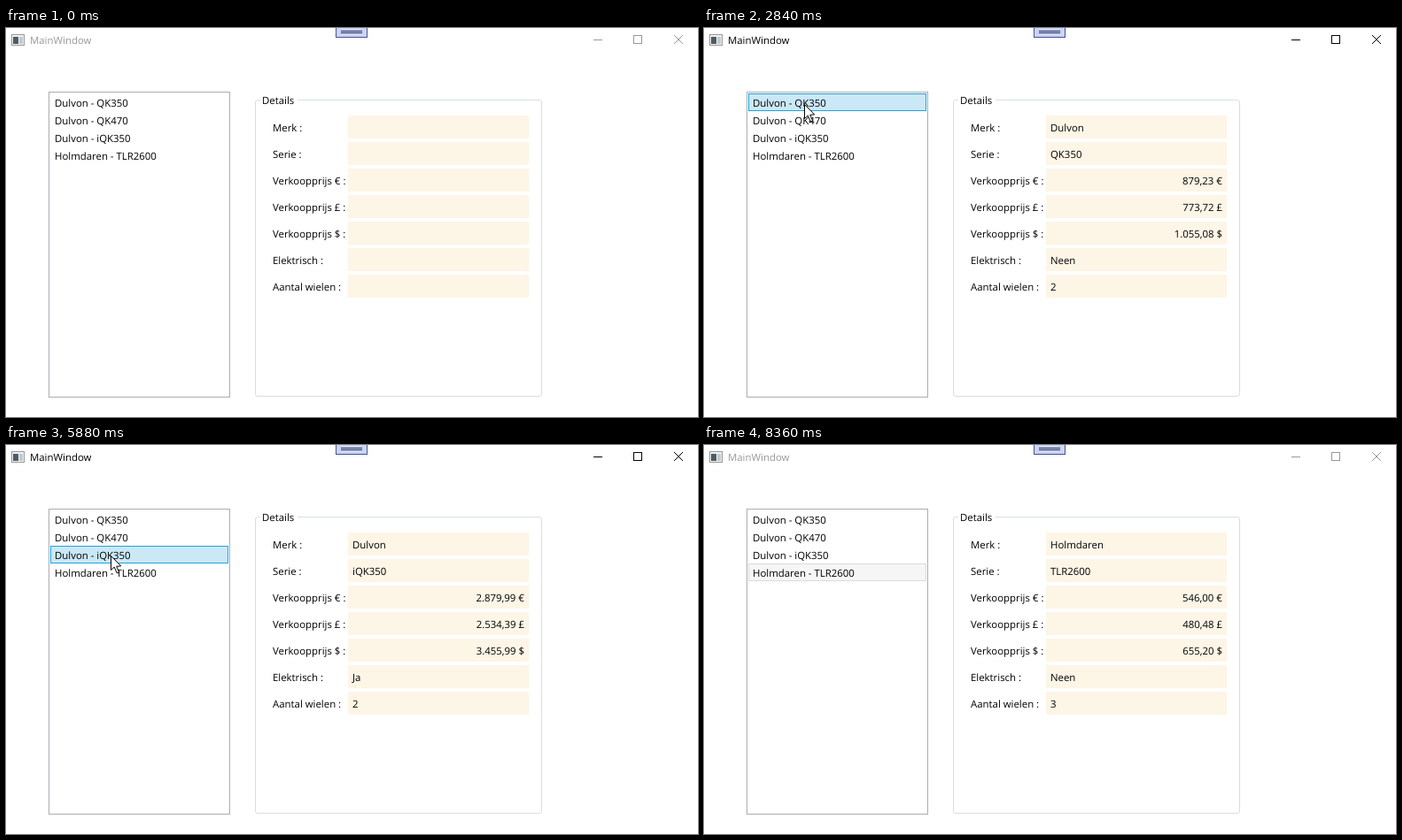
Recreate the animation shown at these times as an HTML page with a canvas. Size 781x440 px, loop 8.55 s.

```html
<!DOCTYPE html>
<html lang="nl">
<head>
<meta charset="utf-8">
<title>MainWindow</title>
<style>
  html, body { margin: 0; width: 100%; height: 100%; overflow: hidden; background: #fff; }
  canvas { display: block; }
</style>
</head>
<body>
<canvas id="stage" width="781" height="440"></canvas>
<script>
const ctx = document.getElementById('stage').getContext('2d');
const LOOP = 8550;
const STEP = 74;             // the screen refreshes in steps of this length
const FOCUS = 2690, BLUR = 8360;
const ENTER = 1190, LEAVE = 7510;
const ROW_TOP = 74, ROW_H = 20;

const labels = ['Merk :', 'Serie :', 'Verkoopprijs € :', 'Verkoopprijs £ :',
  'Verkoopprijs $ :', 'Elektrisch :', 'Aantal wielen :'];

const bikes = [
  { brand: 'Dulvon', series: 'QK350', euro: 879.23, electric: 'Neen', wheels: 2, click: FOCUS },
  { brand: 'Dulvon', series: 'QK470', euro: 1245.3, electric: 'Neen', wheels: 2, click: 4720 },
  { brand: 'Dulvon', series: 'iQK350', euro: 2879.99, electric: 'Ja', wheels: 2, click: 5570 },
  { brand: 'Holmdaren', series: 'TLR2600', euro: 546, electric: 'Neen', wheels: 3, click: 6740 }
];

const easeIn = u => u ** 2.4;
const easeOut = u => 1 - (1 - u) ** 2;
const easeBoth = u => u < .5 ? 2 * u * u : 1 - 2 * (1 - u) ** 2;

// Pointer glides, each from the last resting place
const entry = { x: 277, y: 349 };
const glides = [
  { at: ENTER, steps: 6, x: 127, y: 70, ease: easeOut },
  { at: 1640, steps: 4, x: 116, y: 87, ease: easeOut },
  { at: 2220, steps: 2, x: 113, y: 86, ease: easeOut },
  { at: 3320, steps: 1, x: 113, y: 81, ease: easeOut },
  { at: 3780, steps: 4, x: 117, y: 108, ease: easeBoth },
  { at: 4320, steps: 2, x: 117, y: 105, ease: easeOut },
  { at: 5040, steps: 6, x: 119, y: 129, ease: easeIn },
  { at: 5740, steps: 4, x: 118, y: 124, ease: easeOut },
  { at: 6200, steps: 6, x: 119, y: 152, ease: easeBoth },
  { at: 6740, steps: 5, x: 117, y: 142, ease: easeBoth },
  { at: 7220, steps: 4, x: 497, y: 322, ease: easeBoth }
];

const arrow = new Path2D('M0 0V16L3.7 12.6L6.8 19.5L9.2 18.5L6.2 11.8L11.2 11.4Z');

function pointerAt(t) {
  if (t < ENTER || t >= LEAVE) return null;
  const i = glides.filter(g => g.at <= t).length - 1;
  const from = glides[i - 1] || entry, to = glides[i];
  const done = Math.floor((t - to.at) / STEP) + 1;
  const p = to.ease(Math.min(done / to.steps, 1));
  const mix = (a, b) => Math.round(a + (b - a) * p);
  return { x: mix(from.x, to.x), y: mix(from.y, to.y) };
}

const selectedAt = t => bikes.filter(b => b.click <= t).length - 1;

function money(value, sign) {
  const [whole, cents] = value.toFixed(2).split('.');
  return whole.replace(/\B(?=(\d{3})+$)/g, '.') + ',' + cents + ' ' + sign;
}

const details = b => [b.brand, b.series, money(b.euro, '€'), money(b.euro * .88, '£'),
  money(b.euro * 1.2, '$'), b.electric, b.wheels];

function fill(x, y, w, h, color) {
  ctx.fillStyle = color;
  ctx.fillRect(x, y, w, h);
}

function frame(x, y, w, h, color) {
  ctx.strokeStyle = color;
  ctx.strokeRect(x + .5, y + .5, w - 1, h - 1);
}

function text(str, x, y, color = '#000', align = 'left') {
  ctx.fillStyle = color;
  ctx.textAlign = align;
  ctx.fillText(str, x, y);
}

function line(x1, y1, x2, y2) {
  ctx.beginPath();
  ctx.moveTo(x1, y1);
  ctx.lineTo(x2, y2);
  ctx.stroke();
}

function drawTitleBar(active) {
  const color = active ? '#000' : '#999';

  fill(6, 7, 15, 13, '#f0f0f0');
  frame(6, 7, 15, 13, '#999');
  fill(8, 10, 6, 8, '#4d5d68');
  fill(15, 10, 4, 8, '#c4c9cc');
  text('MainWindow', 27, 18, color);

  fill(372, 0, 36, 11, '#ccd5f0');
  frame(372, -1, 36, 12, '#44549b');
  fill(378, 3, 24, 1, '#28335f');
  fill(378, 5, 24, 1, '#28335f');

  fill(663, 13, 10, 1, color);
  frame(708, 8, 10, 10, color);
  line(754, 8, 764, 18);
  line(764, 8, 754, 18);
}

function drawList(selected, hovered, active) {
  frame(48, 72, 205, 346, '#abadb3');
  bikes.forEach((bike, i) => {
    const y = ROW_TOP + i * ROW_H;
    let look = null;
    if (i === selected) look = active ? ['#cbe8f6', '#26a0da'] : ['#f6f6f6', '#dadada'];
    else if (i === hovered) look = ['#e5f3fb', '#70c0e7'];
    if (look) {
      fill(50, y, 201, ROW_H, look[0]);
      frame(50, y, 201, ROW_H, look[1]);
    }
    text(bike.brand + ' - ' + bike.series, 55, y + 15);
  });
}

function drawDetails(bike) {
  ctx.strokeStyle = '#d5dfe5';
  ctx.beginPath();
  ctx.roundRect(281.5, 81.5, 323, 335, 2.5);
  ctx.stroke();
  fill(287, 80, 42, 3, '#fff');
  text('Details', 289, 86);

  const values = bike ? details(bike) : [];
  labels.forEach((label, i) => {
    const y = 99 + i * 30;
    const price = label.startsWith('Verkoopprijs');
    text(label, 301, y + 18);
    fill(386, y, 204, 26, '#fdf5e6');
    text(values[i] ?? '', price ? 585 : 391, y + 18, '#000', price ? 'right' : 'left');
  });
}

function drawPointer({ x, y }) {
  ctx.save();
  ctx.translate(x + .5, y + .5);
  ctx.fillStyle = '#fff';
  ctx.fill(arrow);
  ctx.strokeStyle = '#000';
  ctx.stroke(arrow);
  ctx.restore();
}

function render(t) {
  const active = t >= FOCUS && t < BLUR;
  const pointer = pointerAt(t);
  // Row highlight and details trail the pointer by one step
  const past = pointerAt(t - STEP);
  const hovered = pointer && past ? Math.floor((past.y - ROW_TOP) / ROW_H) : -1;

  fill(0, 0, 781, 440, '#fff');
  ctx.lineWidth = 1;
  ctx.font = '11.4px "Open Sans", "Noto Sans", sans-serif';
  ctx.textRendering = 'geometricPrecision';
  drawTitleBar(active);
  drawList(selectedAt(t), hovered, active);
  drawDetails(bikes[selectedAt(t - STEP)]);
  if (pointer) drawPointer(pointer);
}

const start = performance.now();
function tick() {
  render((performance.now() - start) % LOOP);
  requestAnimationFrame(tick);
}
tick();
</script>
</body>
</html>
```
